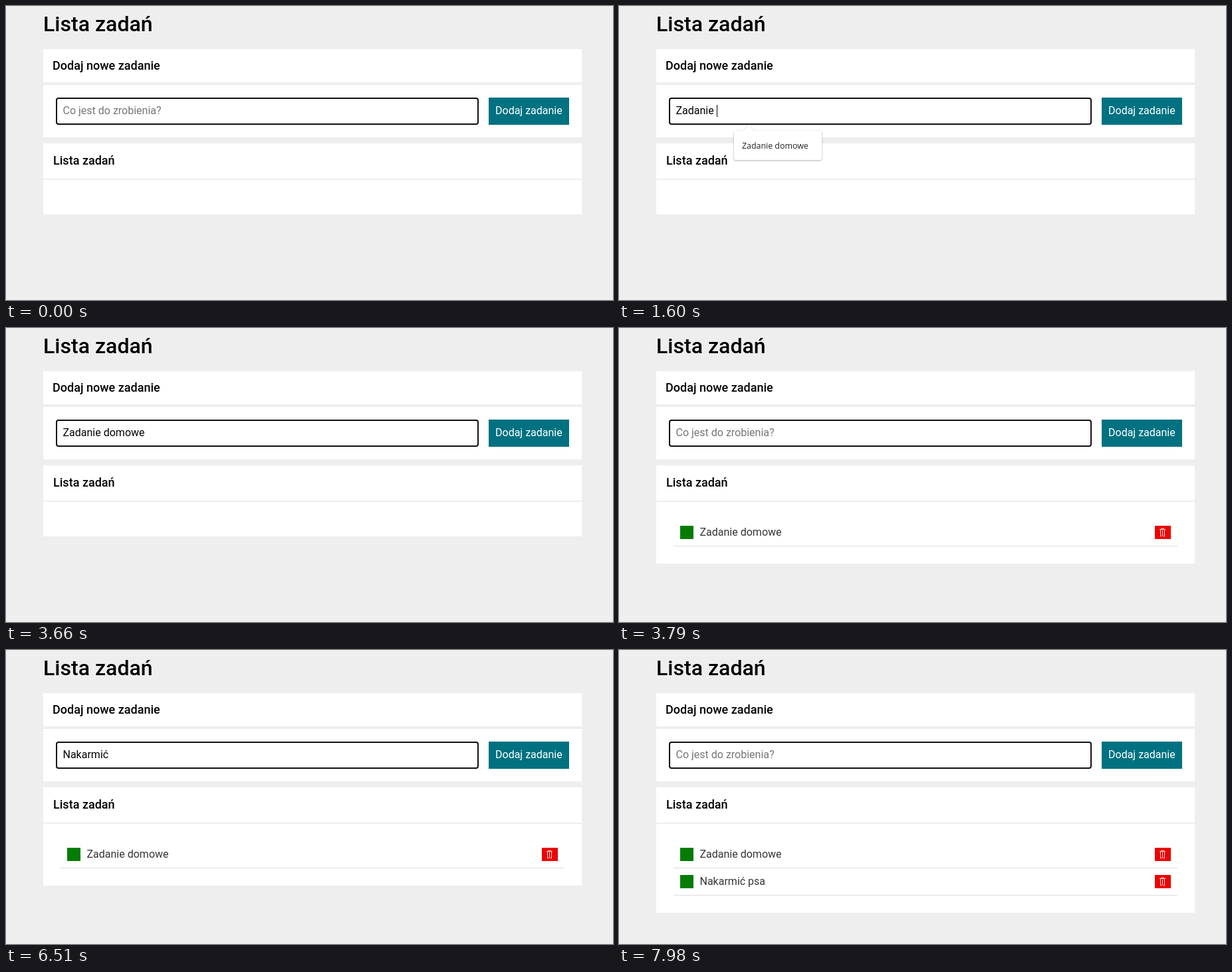
Animation of 913x443 px, one loop 8000 ms. Source, as an HTML page:

```html
<!DOCTYPE html>
<html lang="pl">
<head>
<meta charset="utf-8">
<title>Lista zadań</title>
<style>
  html, body { margin: 0; width: 100%; height: 100%; overflow: hidden; background: #eee; }
  svg { display: block; font: 400 16px Roboto, sans-serif; }
  .head { font-weight: 500; font-size: 18px; }
  .title { font-weight: 500; font-size: 32px; }
  .tip { font: 12.4px "Open Sans", "Noto Sans", sans-serif; fill: #222; }
  .panel { fill: #fff; }
  #popup { filter: drop-shadow(0 1px 1.5px rgba(0, 0, 0, .32)); }
  text { white-space: pre; }
</style>
</head>
<body>
<svg width="913" height="443" viewBox="0 0 913 443">
  <defs>
    <g id="row">
      <rect x="92" y="298" width="20" height="20" fill="#047c06"/>
      <rect x="806" y="298" width="24" height="20" fill="#ec0404"/>
      <path d="M813 303.5h9M815 302.3h5M814.5 304v9.5M820.5 304v9.5M817.5 305v8M814 313.5h2.5M818.5 313.5h2.5"
            fill="none" stroke="#fff" stroke-opacity=".85"/>
      <rect x="82" y="328" width="758" height="1" fill="#ddd"/>
    </g>
  </defs>
  <rect width="913" height="443" fill="#eee"/>
  <text class="title" x="56" y="38">Lista zadań</text>

  <rect class="panel" x="56" y="65" width="810" height="50"/>
  <text class="head" x="70" y="96">Dodaj nowe zadanie</text>

  <rect class="panel" x="56" y="119" width="810" height="79"/>
  <rect x="76" y="139" width="634" height="39" rx="3" fill="#fff" stroke="#101010" stroke-width="2"/>
  <text id="hint" x="85.5" y="163" fill="#757575">Co jest do zrobienia?</text>
  <text id="value" x="85.5" y="163" xml:space="preserve"></text>
  <rect id="caret" y="149" width="1" height="18"/>
  <rect x="726" y="138" width="121" height="41" fill="#007180"/>
  <text x="736" y="163" fill="#fff">Dodaj zadanie</text>

  <rect class="panel" x="56" y="207" width="810" height="53"/>
  <text class="head" x="71" y="239">Lista zadań</text>
  <rect class="panel" id="list" x="56" y="262" width="810" height="52"/>
  <g class="task">
    <use href="#row"/>
    <text x="121.5" y="313" fill="#333">Zadanie domowe</text>
  </g>
  <g class="task" transform="translate(0 41)">
    <use href="#row"/>
    <text x="121.5" y="313" fill="#333">Nakarmić psa</text>
  </g>

  <g id="popup">
    <path d="M176 188H187L195 180L203 188H302Q305 188 305 191V229Q305 232 302 232H176Q173 232 173 229V191Q173 188 176 188Z" fill="#fff"/>
    <text class="tip" x="185" y="215">Zadanie domowe</text>
  </g>
</svg>
<script>
const LOOP = 8000;
const $ = id => document.getElementById(id);
const hint = $('hint'), value = $('value'), caret = $('caret'), list = $('list'), popup = $('popup');
const tasks = document.querySelectorAll('.task');

// One key press per time, in order of the letters.
const typed = (word, times) => times.map((t, i) => [t, word.slice(0, i + 1), true]);

// [time, field text, caret visible]
const field = [
  [0, '', false],
  ...typed('Zadanie domowe',
    [330, 400, 930, 1060, 1330, 1400, 1530, 1600, 1860, 1930, 2130, 2590, 2990, 3130]),
  [3660, 'Zadanie domowe', false],
  [3790, '', false],
  [4320, '', true],
  ...typed('Nakarmić ', [4390, 4590, 4790, 4920, 5120, 5320, 5450, 5850, 5980]),
  [6510, 'Nakarmić ', false],
  ...[[6910, 'p'], [7110, 'ps'], [7180, 'psa']].map(([t, s]) => [t, 'Nakarmić ' + s, true]),
  [7710, 'Nakarmić psa', false],
  [7980, '', false]
];
const fade = [[0, 0], [400, 1], [3190, .66], [3260, .3], [3330, 0]];
const count = [[0, 0], [3790, 1], [7980, 2]];
const listHeight = [52, 93, 134];

const at = (steps, t) => steps.findLast(s => s[0] <= t);

function draw(t) {
  const [, text, blink] = at(field, t);
  if (value.textContent !== text) value.textContent = text;
  hint.style.display = text ? 'none' : '';
  caret.style.display = blink ? '' : 'none';
  const width = text ? value.getComputedTextLength() : 0;
  caret.setAttribute('x', Math.round(85.5 + width));

  popup.style.opacity = at(fade, t)[1];
  const n = at(count, t)[1];
  list.setAttribute('height', listHeight[n]);
  tasks.forEach((task, i) => task.style.display = i < n ? '' : 'none');
}

const start = performance.now();
function tick() {
  draw((performance.now() - start) % LOOP);
  requestAnimationFrame(tick);
}
tick();
</script>
</body>
</html>
```
